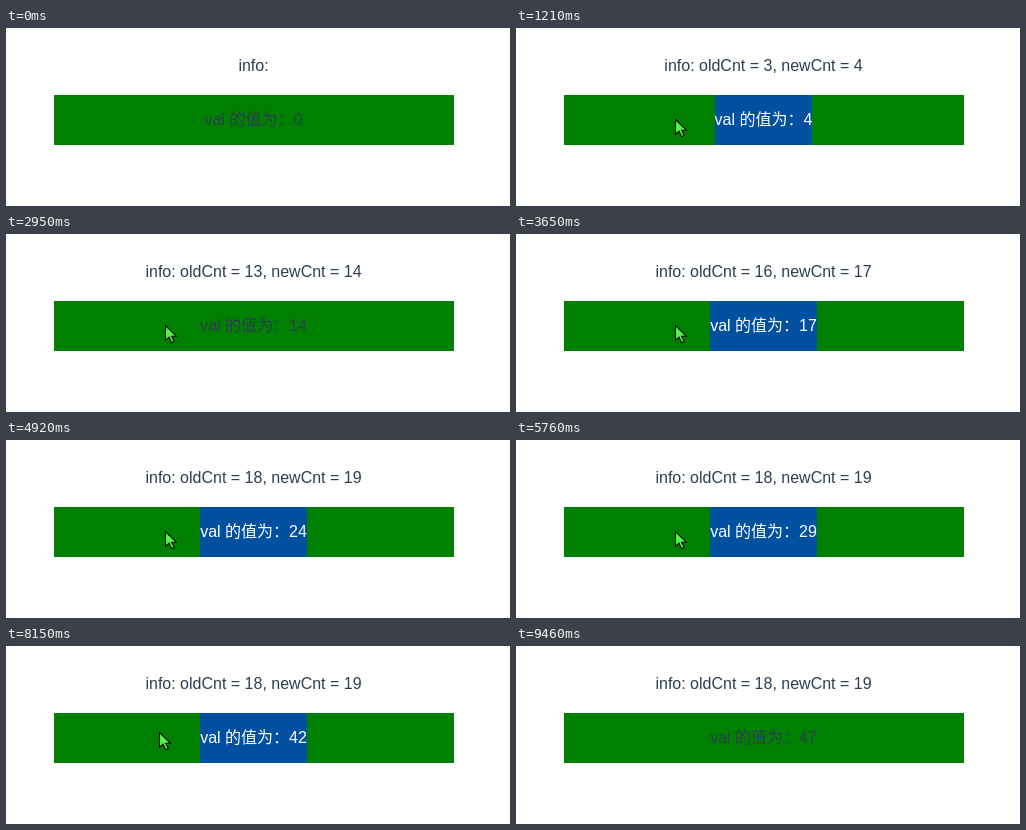
Animation, 504 px wide and 178 px high, one loop 9930 ms. Source, as an HTML page:

```html
<!DOCTYPE html>
<html lang="zh-CN">
<head>
<meta charset="utf-8">
<style>
  html, body { margin: 0; width: 504px; height: 178px; overflow: hidden; background: #fff; }
  body { position: relative; font: 16px/50px "Liberation Sans", Arial, "Noto Sans CJK SC", "Noto Sans CJK", sans-serif; color: #2c3e50; }
  div { position: absolute; left: 48px; width: 400px; height: 50px; text-align: center; white-space: pre; }
  #info { top: 13px; left: 47.5px; }
  #box { top: 67px; background: #008000; }
  #val { display: inline-block; position: relative; left: -.5px; height: 50px; }
  #val.selected { background: #0050a0; color: #fff; }
  #cursor { position: absolute; left: 0; top: 0; overflow: visible; }
</style>
</head>
<body>
<div id="info"></div>
<div id="box"><span id="val"></span></div>
<svg id="cursor" width="14" height="20">
  <path d="M.5 .5V15.3L4 12.2L6.6 17.8L9.2 16.6L6.7 11.2H11.3Z" fill="#55f548" stroke="#000" stroke-width="1.1"/>
</svg>
<script>
const LOOP = 9930, LAST_INFO = 19, ENTER = 140, LEAVE = 9220;
const [info, val, cursor] = ['info', 'val', 'cursor'].map(id => document.getElementById(id));

// Clicking rhythm: time, mouse presses and releases so far
const clicks = [
  [450, 0], [550, 1], [700, 2], [1630, 13], [1960, 15], [2950, 27],
  [3650, 34], [4070, 40], [4920, 48], [6830, 71], [8150, 84], [8890, 93]
];

// Pointer: time, x, y
const path = [
  [ENTER, 71, 169], [490, 159, 91], [7600, 159, 91], [7700, 153, 86],
  [9000, 153, 86], [9130, 136, 140], [LEAVE, 107, 178]
];

// Linear interpolation of every value after the time, clamped at both ends
function at(keys, t) {
  const next = keys.findIndex(k => k[0] > t);
  if (next < 1) return keys.at(next).slice(1);
  const a = keys[next - 1], b = keys[next];
  const p = (t - a[0]) / (b[0] - a[0]);
  return a.slice(1).map((v, i) => v + (b[i + 1] - v) * p);
}

function draw(t) {
  const n = Math.floor(at(clicks, t)[0] + 0.05);
  const count = Math.ceil(n / 2);
  const seen = Math.min(count, LAST_INFO);
  info.textContent = seen ? `info: oldCnt = ${seen - 1}, newCnt = ${seen}` : 'info:';
  val.textContent = `val 的值为：${count}`;
  // A press selects the line; the release updates the text and clears the selection
  val.classList.toggle('selected', n > 0 && n % 2 === 0);

  const [x, y] = at(path, t).map(Math.round);
  cursor.style.transform = `translate(${x}px, ${y}px)`;
  cursor.style.visibility = t >= ENTER && t < LEAVE ? 'visible' : 'hidden';
}

const start = performance.now();
function tick() {
  draw((performance.now() - start) % LOOP);
  requestAnimationFrame(tick);
}
tick();
</script>
</body>
</html>
```
